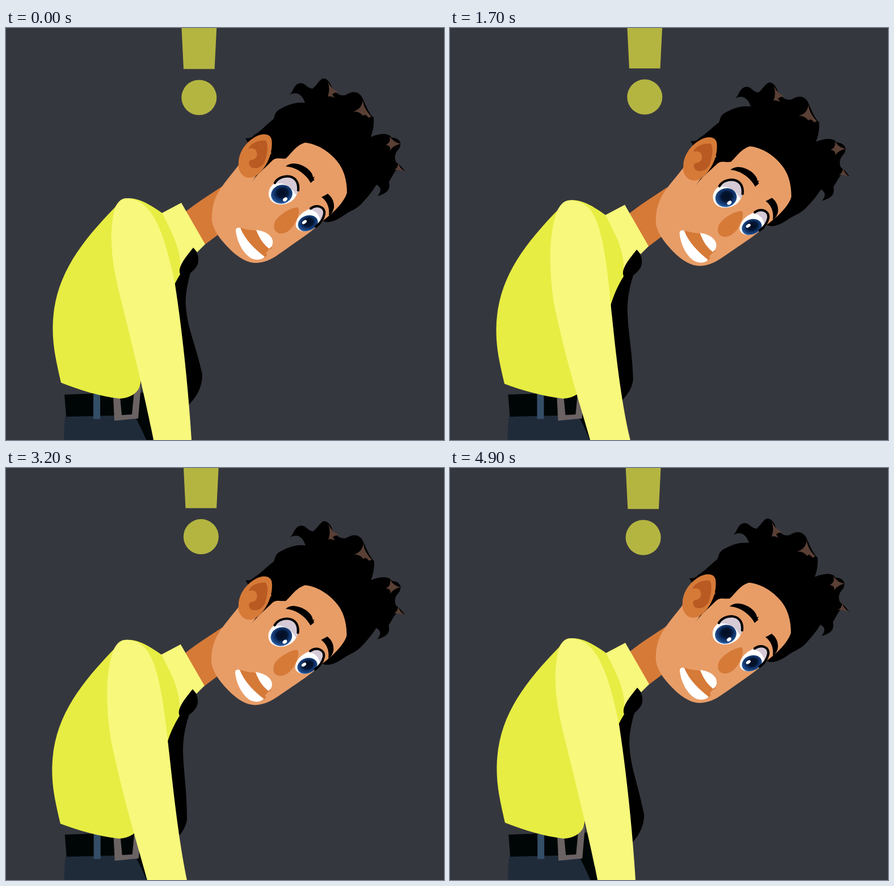
An HTML page for the animation above (5 s loop, 772x726 px).

```html
<!DOCTYPE html>
<html lang="en">
<head>
<meta charset="utf-8">
<title>Startled man</title>
<style>
  html, body { margin: 0; width: 100%; height: 100%; overflow: hidden; background: #35373e; }
  svg { display: block; width: 100%; height: 100%; }
  .skin { fill: #e89d67; }
  .shade { fill: #d67a38; }
  .light { fill: #f8f87c; }
  .lid { fill: none; stroke: #000; stroke-width: 4.2; stroke-linecap: round; }
</style>
</head>
<body>
<svg viewBox="0 0 772 726">
  <defs>
    <radialGradient id="iris" cx=".54" cy=".44" r=".6">
      <stop offset="0" stop-color="#030d22"/>
      <stop offset=".42" stop-color="#051632"/>
      <stop offset=".55" stop-color="#0d2c60"/>
      <stop offset=".78" stop-color="#1c4680"/>
      <stop offset="1" stop-color="#3d7cca"/>
    </radialGradient>
    <clipPath id="clipL"><path id="eyeL"/></clipPath>
    <clipPath id="clipR"><path id="eyeR"/></clipPath>
  </defs>

  <g id="mark" fill="#b4b541">
    <path d="M-31.5 -135H31.5L27.3 -50.3H-27.3Z"/>
    <circle r="31"/>
  </g>

  <g id="hips">
    <path fill="#000606" d="M103 646L160 644L270 642V740H230L200 690L106 685Z"/>
    <path fill="#202b3a" d="M104 685L226 682Q236 700 249 730H102Q102 704 104 685Z"/>
    <path fill="#344e68" d="M154 645H166V689H154Z"/>
    <path fill="#6b6363" d="M189 650H201L204 682L222 681L226 638L238 630L233 688L191 692Z"/>
  </g>

  <g id="body">
    <path class="shade" d="M316 324C340 305 362 292 384 277L420 330L374 364L350 382Z"/>
    <path id="torso" fill="#e7ed43"/>
    <path class="light" d="M275 326L309 308L351 381L337 395L330 388L307 422C308 405 303 388 298 374C291 357 283 341 275 326Z"/>
    <path id="tie"/>
    <path id="arm" class="light"/>
  </g>

  <g id="head">
    <path class="skin" d="M414 236C404 250 391 265 381 279C367 298 362 317 363 340C366 359 381 377 400 395C414 407 427 414 441 414C461 413 473 404 486 395L530 364C541 356 549 349 558 341L605 310V250L560 195H500L465 220Z"/>
    <path d="M432 273C441 259 455 248 468 235C476 227 480 231 493 230C501 224 510 207 527 202C548 204 569 217 583 234C596 249 601 270 601 290C597 306 577 326 558 340C568 345 582 340 597 329C609 321 619 319 630 306C639 296 645 289 653 276C663 282 661 288 655 296C672 291 678 285 675 271C679 265 683 256 688 250Q697 247 704 254Q696 242 688 237C684 230 685 222 690 216Q695 211 695 206C697 200 690 193 679 193C677 186 662 184 643 192C647 181 649 170 648 158C638 149 633 132 627 121C620 111 610 111 599 118C588 121 581 114 575 106C571 94 565 88 558 89C550 94 548 101 540 107C529 105 529 98 520 97C506 98 507 113 499 118C514 110 523 119 527 132C509 130 495 136 481 144C472 150 474 157 471 161C460 169 449 182 438 188Q431 196 422 194L428 205L445 210L468 220Z"/>
    <g fill="#5a3f35">
      <path d="M567 94Q573 108 586 113Q577 114 575 117L579 123Q572 119 567 121Q572 108 567 94Z"/>
      <path d="M629 125Q628 139 644 156L639 158Q633 150 629 155Q624 147 612 147Q628 143 629 125Z"/>
      <path d="M676 191Q684 202 695 204Q682 207 677 216Q679 207 669 206Q679 202 676 191Z"/>
      <path d="M691 237Q693 247 704 254Q694 249 684 250Q692 246 691 237Z"/>
    </g>
    <path class="shade" d="M410 237C410 222 420 203 439 192C451 185 465 185 468 196C471 213 464 238 449 253C439 265 424 268 415 257C410 251 409 245 410 237Z"/>
    <path fill="#b85a22" d="M427 213C432 202 444 198 457 198C463 203 461 222 456 236C450 246 441 249 433 246C426 241 427 232 435 232C440 231 444 226 442 219C440 212 434 211 427 213Z"/>

    <path d="M493 244C503 235 518 239 529 246C537 252 541 258 541 263L544 262L542 266L544 267L537 273C531 261 514 245 493 244Z"/>
    <path d="M556 298L562 295L567 292C575 298 579 307 578 317C576 325 573 328 569 331C571 317 566 305 556 298Z"/>

    <g clip-path="url(#clipL)">
      <path fill="#fff" d="M450 250H525V320H450Z"/>
      <path fill="#d5cad6" d="M470 275C487 270 503 279 511 294L525 290V250H470Z"/>
      <ellipse cx="486" cy="293" rx="19" ry="16.5" fill="url(#iris)" transform="rotate(-15 486 293)"/>
      <ellipse cx="492" cy="302" rx="4.3" ry="3" fill="#fff" transform="rotate(-35 492 302)"/>
    </g>
    <path id="lidL" class="lid"/>
    <g clip-path="url(#clipR)">
      <path fill="#fff" d="M500 305H570V370H500Z"/>
      <path fill="#d5cad6" d="M533 320C547 321 553 330 555 342L570 335V305H533Z"/>
      <ellipse cx="532" cy="344.5" rx="18" ry="14" fill="url(#iris)" transform="rotate(-20 532 344)"/>
      <ellipse cx="526" cy="342" rx="4.6" ry="2.7" fill="#fff" transform="rotate(-35 526 342)"/>
    </g>
    <path id="lidR" class="lid"/>

    <path class="shade" d="M514 316C519 321 515 333 510 342C505 354 493 364 482 362C471 360 470 347 476 338C485 327 501 317 514 316Z"/>
    <path class="shade" d="M411 351C421 355 431 356 442 357L469 388L463 391L458 397L460 400L456 405L430 390Z"/>
    <path fill="#fff" d="M405 357Q405 351 413 352C421 373 439 390 456 403C451 409 440 410 431 405C416 395 407 375 405 357Z"/>
    <path fill="#fff" d="M441 356C454 357 468 364 470 375C471 382 468 386 464 389C454 381 447 372 441 356Z"/>
  </g>
</svg>
<script>
const LOOP = 5000, STEP = 100;
const el = id => document.getElementById(id);

// time, mark x/y, head turn/x/y, body x/y, arm swing, tie swing, hips x
const keys = [
  [0,    340.3, 122.5, 0,   0,    0,   0,    0,   0,   0,    0],
  [500,  341.1, 122.4, .5,  0,    2,   -.2,  1.9, .03, .25,  -.5],
  [1200, 342.4, 122,   .88, 0,    3.8, -.6,  3,   .73, .6,   -.8],
  [2300, 343.9, 121.1, .85, -.8,  4.3, -1.2, 3.6, 1,   1,    0],
  [2800, 344,   121,   .72, -.9,  3.7, -1.2, 3.3, .94, 1.03, .4],
  [3600, 343.4, 121.3, .35, -1.2, 2.3, -1.1, 2.1, .53, .82,  .8],
  [4900, 340.6, 122.5, .01, -.1,  0,   0,    .1,  0,   .14,  .2]
];

const arm = [
  "M192 318C198 304 204 300 214 300C245 303 273 325 298 452C310 530 321 630 327 726L328 745L264 745L260 726C250 675 238 622 203 480C190 430 178 370 192 318Z",
  "M191 316C198 304 204 300 214 300C252 303 270 325 283 489C290 557 298 647 318 723L324 745L253 745L247 723C231 667 206 597 182 482C176 437 171 362 191 316Z"
];
const tie = [
  "M330 387C341 398 341 412 336 420C332 426 328 429 325 432C317 460 316 480 317 490C320 530 332 550 346 610C346 635 334 652 322 664",
  "M330 387C341 398 341 412 336 420C332 426 328 429 324 432C315 458 313 480 313 497C314 537 320 567 319 618C316 633 308 642 299 652"
];
const tieBack = "L285 640L283 489C289 467 297 450 307 434C302 423 313 408 330 387Z";

// each eye: upper lid line and lower rim, open then shut
const eyes = {
  L: [["M474 273C482 257 518 254 515 286", "M460 290C470 293 474 307 491 312"],
      ["C511 304 497 311 483 311C470 310 462 302 463 290C464 283 467 278 474 273Z",
       "C488 312 484 311 480 310C473 309 467 306 464 300C462 296 461 293 460 290Z"]],
  R: [["M537 318C548 310 563 315 561 328C559 338 553 345 546 350", "M512 339C517 341 521 345 524 349C527 353 529 356 531 359"],
      ["C536 360 517 362 511 350C510 338 518 325 537 318Z",
       "C525 361 515 360 511 352C510 346 510 342 512 339Z"]]
};

function mix([a, b], k) {
  const end = b.match(/-?[\d.]+/g);
  let i = 0;
  return a.replace(/-?[\d.]+/g, n => (+n + (end[i++] - n) * k).toFixed(2));
}

// key row by index, wrapping around the loop
function row(i) {
  const n = keys.length, turn = Math.floor(i / n);
  const r = keys[i - turn * n].slice();
  r[0] += turn * LOOP;
  return r;
}

function slope(i, c) {
  const [a, b, d] = [row(i - 1), row(i), row(i + 1)];
  const p = (b[c] - a[c]) / (b[0] - a[0]);
  const q = (d[c] - b[c]) / (d[0] - b[0]);
  return p * q > 0 ? 2 * p * q / (p + q) : 0;
}

function sample(t) {
  let i = keys.length - 1;
  while (keys[i][0] > t) i--;
  const a = row(i), b = row(i + 1), h = b[0] - a[0], u = (t - a[0]) / h;
  return a.map((v, c) => c === 0 ? t :
    v + (b[c] - v) * u * u * (3 - 2 * u) +
    h * u * (1 - u) * (slope(i, c) * (1 - u) - slope(i + 1, c) * u)).slice(1);
}

// the hem stays on the belt while the shoulders sink by drop
const torso = drop =>
  `M97 ${625 - drop * .4}C88 585 82 560 82.5 525C84 440 130 380 192 316C198 306 204 300 214 300C235 299 255 312 275 326L290 324L306 374
  C309 390 309 412 307 437L298 453L270 540L237 ${618 - drop}C239 ${640 - drop} 222 ${652 - drop} 200 ${653 - drop}C165 ${649 - drop} 130 ${638 - drop * .6} 97 ${625 - drop * .4}Z`;

const move = (id, x, y, extra = "") => el(id).setAttribute("transform", `translate(${x} ${y})${extra}`);
const shape = (id, d) => el(id).setAttribute("d", d);

function draw(t) {
  const [mx, my, turn, hx, hy, bx, by, swing, tail, hips] = sample(t);
  move("mark", mx, my);
  move("head", hx, hy, ` rotate(${turn} 370 349)`);
  move("body", bx, by);
  move("hips", hips, 0);
  shape("torso", torso(by));
  shape("arm", mix(arm, swing));
  shape("tie", mix(tie, tail) + tieBack);
  const shut = Math.max(0, 1 - Math.abs(t - 2300) / 200);
  for (const side in eyes) {
    const [lid, rim] = eyes[side].map(pair => mix(pair, shut));
    shape("lid" + side, lid);
    shape("eye" + side, lid + rim);
  }
}

const start = performance.now();
function tick() {
  const t = (performance.now() - start) % LOOP;
  draw(Math.floor(t / STEP) * STEP);
  requestAnimationFrame(tick);
}
tick();
</script>
</body>
</html>
```
